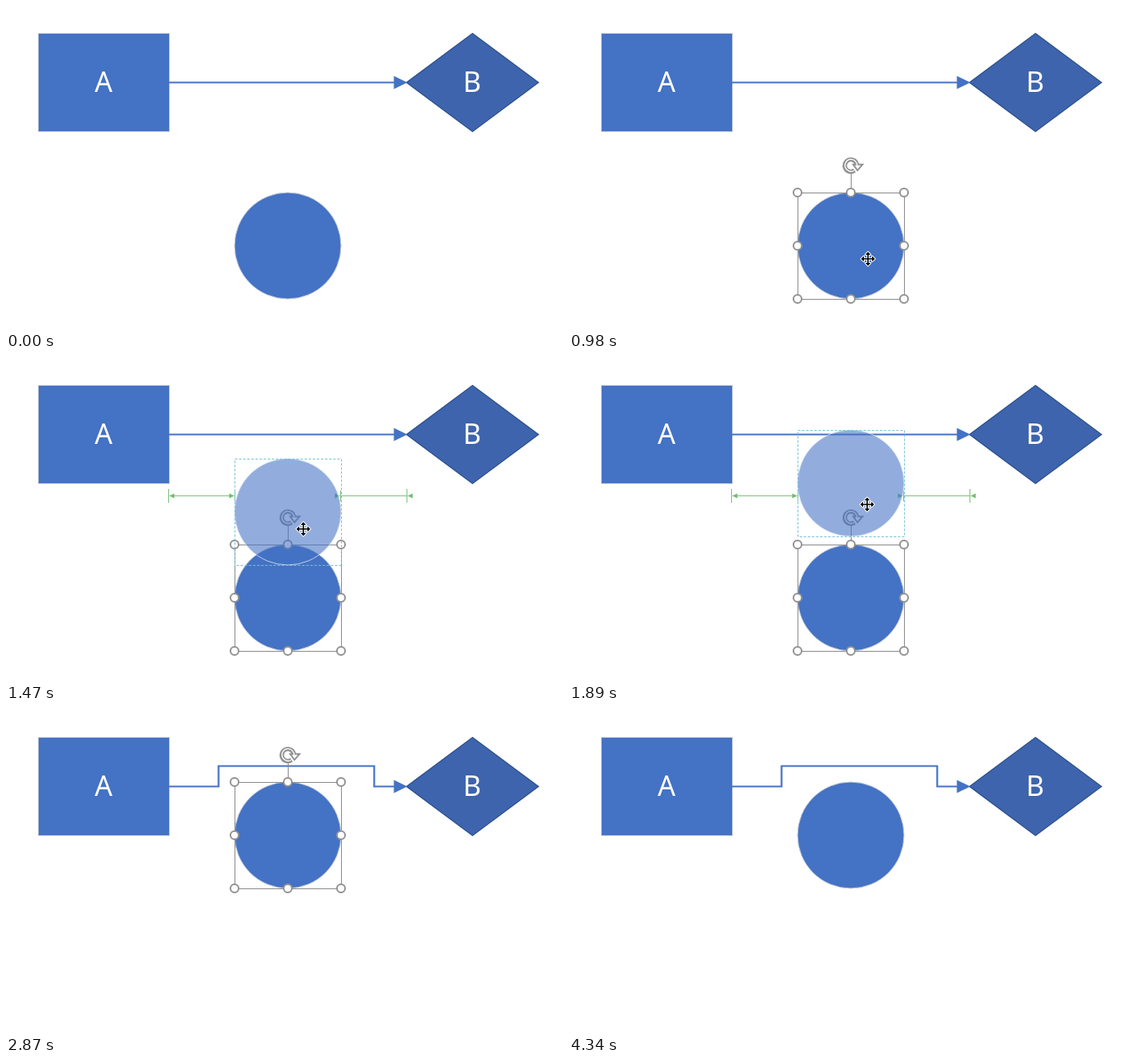
Recreate the animation shown at these times as an HTML page. Size 680 px wide and 396 px high, loop 5340 ms.

```html
<!DOCTYPE html>
<html lang="en">
<head>
<meta charset="utf-8">
<title>Connector rerouting</title>
<style>
  html, body { margin: 0; width: 100%; height: 100%; overflow: hidden; background: #fff; }
  svg { display: block; width: 680px; height: 396px; }
  text { font: 34px "Noto Sans", "Open Sans", sans-serif; fill: #fff; text-anchor: middle; }
  .shape { fill: #4472c4; }
  .edge { stroke: #c3cbd8; stroke-width: 1; }
  .wire { fill: none; stroke: #4472c4; stroke-width: 2.2; }
  .frame { fill: none; stroke: #8c8c8c; stroke-width: 1; }
  .knob { fill: #fff; stroke: #929292; stroke-width: 2; }
  .guide { fill: none; stroke: #7cc47c; stroke-width: 1; }
  .tip { fill: #6fbe6f; }
  .dash { fill: none; stroke: #76c1d8; stroke-width: 1; stroke-dasharray: 3 2; }
</style>
</head>
<body>
<svg viewBox="0 0 680 396">
  <rect class="shape edge" x="39.5" y="33.5" width="160" height="120"/>
  <text x="119" y="105">A</text>
  <path d="M569.5 33.5L650 93.5L569.5 153.5L489 93.5Z" fill="#3d64ad" stroke="#2f528f" stroke-width="1.4"/>
  <text x="569" y="105">B</text>
  <path id="wire" class="wire"/>
  <path class="shape" d="M473.5 85.5L490 93.5L473.5 101.5Z"/>

  <g id="disc">
    <circle class="shape edge" r="65"/>
    <g id="selection">
      <path class="frame" d="M-64.5 -64.5H65.5V65.5H-64.5ZM.5 -65V-89"/>
      <g id="knobs"></g>
      <g transform="translate(0 -98)" fill="none">
        <path d="M4.5 6A7.4 7.4 0 1 1 7.4 -1" stroke="#929292" stroke-width="5.4"/>
        <path d="M3 -1.2H14.3L8.2 6Z" fill="#fff" stroke="#929292" stroke-width="2"/>
        <path d="M4 6.2A7.4 7.4 0 1 1 7.6 1" stroke="#fff" stroke-width="1.3"/>
      </g>
    </g>
  </g>

  <g id="guides"></g>

  <g id="ghost">
    <circle r="65" fill="#4472c4" fill-opacity=".58" stroke="#dfe7f5" stroke-opacity=".8"/>
    <path class="dash" d="M-64.5 -64.5H65.5V65.5H-64.5Z"/>
  </g>

  <g id="cursor">
    <path id="cross" fill="#000" stroke="#fff" stroke-width="2" paint-order="stroke" stroke-linejoin="round"/>
    <path id="pointer" d="M.5 0V16L4.2 12.6L6.8 18.4L9.4 17.2L6.8 11.6H11.8Z" fill="#fff" stroke="#000"/>
  </g>
</svg>
<script>
const LOOP = 5340, STEP = 70;
const PRESS = 980, DRAG = 1050, GUIDE_IN = 1330, DROP = 2240, LEAVE = 2730, DESELECT = 4270;
const STRAIGHT = "M199 93.5H475";
const DETOUR = "M199 93.5H259.5V68.5H449.5V93.5H475";

// time, x, y
const cursorPath = [
  [280, 350, 345], [560, 350, 344], [840, 363, 306], [980, 365, 309],
  [1470, 363, 209], [1820, 364, 179], [2170, 364, 179], [2310, 359, 173], [2590, 358, 172]
];
const ghostPath = [
  [980, 344, 293], [1330, 344, 213], [1470, 344, 188], [1820, 344, 153]
];

const el = id => document.getElementById(id);
const place = (id, x, y) => el(id).setAttribute("transform", `translate(${x} ${y})`);
const show = (id, on) => { el(id).style.display = on ? "" : "none"; };
const clamp = v => Math.max(0, Math.min(1, v));

function along(path, t) {
  let i = 0;
  while (i < path.length - 2 && t >= path[i + 1][0]) i++;
  const [t0, x0, y0] = path[i], [t1, x1, y1] = path[i + 1];
  const k = clamp((t - t0) / (t1 - t0));
  return [x0 + (x1 - x0) * k, y0 + (y1 - y0) * k];
}

// eight resize handles
let knobs = "";
for (const x of [-65, 0, 65])
  for (const y of [-65, 0, 65])
    if (x || y) knobs += `<circle class="knob" cx="${x}" cy="${y}" r="5"/>`;
el("knobs").innerHTML = knobs;

// four-way arrow
const turn = (x, y, n) => n ? turn(-y, x, n - 1) : `${x} ${y}`;
el("cross").setAttribute("d", [0, 1, 2, 3].map(n =>
  "M" + [[0, -8.5], [3.2, -5], [.8, -5], [.8, 0], [-.8, 0], [-.8, -5], [-3.2, -5]]
    .map(([x, y]) => turn(x, y, n)).join("L") + "Z").join(""));

function span(a, b, inset) {
  const l = a + 1 + inset, r = b - 1 - inset, y = 168.5;
  return `<path class="guide" d="M${a} 160V177M${b} 162V175M${l} ${y}H${r}"/>` +
    `<path class="tip" d="M${l} ${y}l6 -3v6zM${r} ${y}l-6 -3v6z"/>`;
}

function drawGuides(t) {
  const k = t < DROP ? clamp((t - GUIDE_IN + STEP) / 140) : clamp((2450 - t) / 280);
  show("guides", k > 0);
  el("guides").style.opacity = k;
  const inset = 18 * (1 - k);
  el("guides").innerHTML = span(198.5, 279.5, inset) + span(489.5, 408.5, -inset)
    .replace(/M489.5 160V177M408.5 162V175/, "M489.5 160V177M408.5 162V175");
}

function draw(t) {
  const dropped = t >= DROP;
  el("wire").setAttribute("d", dropped ? DETOUR : STRAIGHT);
  place("disc", 344, dropped ? 153 : 293);
  show("selection", t >= PRESS && t < DESELECT);

  show("ghost", t >= DRAG && !dropped);
  place("ghost", ...along(ghostPath, t));
  drawGuides(t);

  show("cursor", t >= cursorPath[0][0] && t < LEAVE);
  place("cursor", ...along(cursorPath, t));
  show("pointer", t < PRESS || dropped);
}

const start = performance.now();
function tick() {
  const t = (performance.now() - start) % LOOP;
  draw(Math.floor(t / STEP) * STEP);
  requestAnimationFrame(tick);
}
draw(0);
requestAnimationFrame(tick);
</script>
</body>
</html>
```
